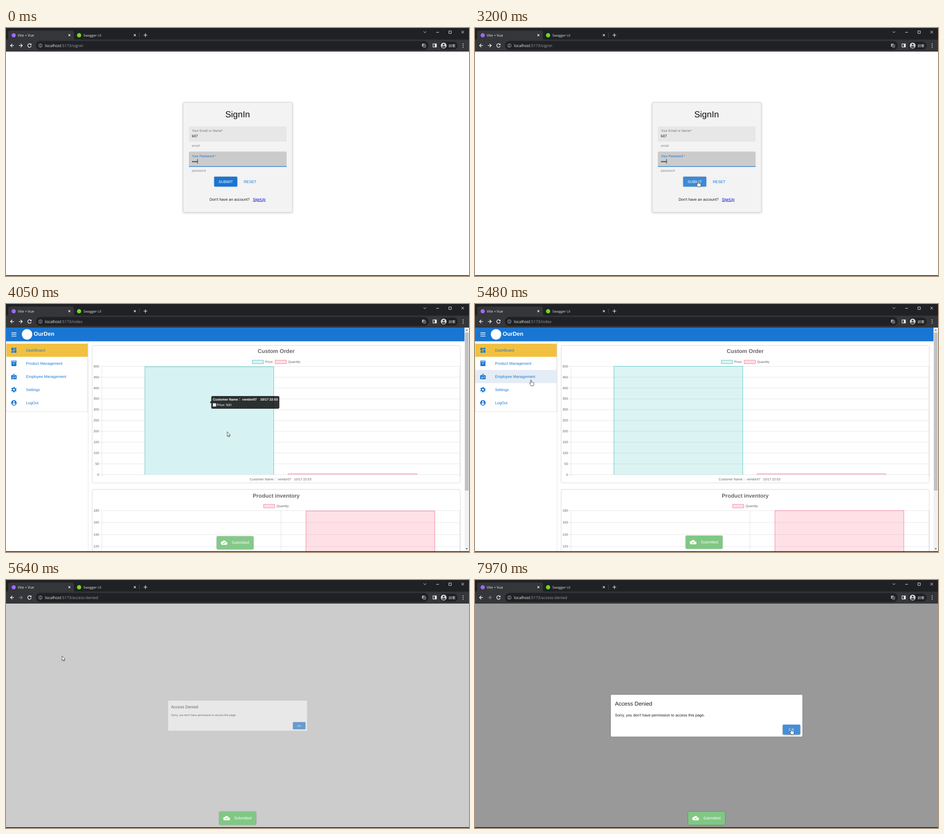
Recreate the animation shown at these times as an HTML page. Size 1023 by 547 pixels, loop 8000 ms.

```html
<!DOCTYPE html>
<html lang="en">
<head>
<meta charset="utf-8">
<title>Sign-in demo</title>
<style>
html, body { margin: 0; width: 100%; height: 100%; overflow: hidden; background: #fff; }
svg { display: block; width: 100vw; height: 100vh; }
text { font-family: "Liberation Sans", Arial, sans-serif; text-rendering: geometricPrecision; white-space: pre; }
.ui { font-family: "Open Sans", "Noto Sans CJK TC", "Noto Sans CJK JP", "Noto Sans CJK", sans-serif; }
.b { font-weight: bold; }
.mid { text-anchor: middle; }
.end { text-anchor: end; }
.lift { filter: drop-shadow(0 .8px 1px rgba(0,0,0,.38)); }
.card { filter: drop-shadow(0 1.5px 2.5px rgba(0,0,0,.2)); }
.line { fill: none; stroke: #fff; stroke-width: 1.1; }
.grid { fill: none; stroke: #000; stroke-opacity: .1; stroke-width: 1; }
</style>
</head>
<body>
<svg id="stage" viewBox="0 0 1023 547" preserveAspectRatio="none"></svg>
<script>
const LOOP = 8000, SIGNED_IN = 3280, DENIED = 5570;
const BLUE = '#1976d2', GREY = '#666';
const TEAL = ['rgba(75,192,192,.2)', 'rgb(75,192,192)'];
const PINK = ['rgba(255,99,132,.2)', 'rgb(240,120,145)'];

const text = (x, y, size, str, fill = '#1d1d1d', cls = '') =>
  `<text x="${x}" y="${y}" font-size="${size}" fill="${fill}" class="${cls}">${str}</text>`;
const rect = (x, y, w, h, fill, more = '') =>
  `<rect x="${x}" y="${y}" width="${w}" height="${h}" fill="${fill}" ${more}/>`;
const path = (d, more = '') => `<path d="${d}" ${more}/>`;
const circle = (x, y, r, fill, more = '') =>
  `<circle cx="${x}" cy="${y}" r="${r}" fill="${fill}" ${more}/>`;
const group = (id, body, more = '') => `<g id="${id}" ${more}>${body}</g>`;
const icon = (cx, cy, body) =>
  `<g transform="translate(${cx - 7.25} ${cy - 7.25}) scale(.604)" fill="${BLUE}">${body}</g>`;
const cross = (x, y, r) => path(`M${x - r} ${y - r}l${2 * r} ${2 * r}m0 ${-2 * r}l${-2 * r} ${2 * r}`, 'class="line"');

// Browser window
function browser() {
  return rect(0, 0, 1023, 26, '#202124') + rect(0, 25.5, 1023, 26.5, '#35363a') +
    path('M1 26Q5 26 5 22V10Q5 5.500 9.500 5.500H145.500Q150 5.500 150 10V22Q150 26 154 26z', 'fill="#35363a"') +
    circle(17, 16, 4.6, '#9a6cf5') + text(26, 18.8, 7.75, 'Vite + Vue', '#f1f3f4', 'ui') + cross(140, 15.7, 2.1) +
    circle(161.5, 16, 4.7, '#6fd925') + text(171, 18.8, 7.55, 'Swagger UI', '#dfe1e5', 'ui') + cross(284.7, 15.7, 2.1) +
    rect(294, 10, 0.8, 11, '#55565a') +
    path('M304 15.700h8m-4 -4v8', 'class="line" stroke-width="1.3"') +
    path('M922.500 7.500l3 3 3-3M950.500 9.500h6M978.500 6.500h5.500v5.500h-5.500zM1006.300 6.300l5.600 5.600m0-5.600l-5.600 5.600', 'class="line" style="stroke-width:.9"') +
    path('M17.500 38.700h-7.500m3.700-3.700l-3.700 3.700 3.700 3.700', 'class="line" style="stroke-width:1.3"') +
    path('M28.500 38.700h7.500m-3.700-3.700l3.700 3.700-3.700 3.700', 'id="forward" class="line" style="stroke-width:1.3"') +
    path('M55 36.200a3.900 3.900 0 1 0 .7 3.500', 'class="line" style="stroke-width:1.3"') +
    path('M56.300 34.200v3.600h-3.600z', 'fill="#fff"') +
    rect(66, 28.5, 868, 20, '#202124', 'rx="10"') +
    circle(76, 38.7, 3.8, 'none', 'stroke="#bdc1c6" stroke-width=".9"') +
    rect(75.5, 38, 1, 3, '#bdc1c6') + rect(75.5, 36.2, 1, 1, '#bdc1c6') +
    `<text x="86" y="41.700" font-size="8.600" class="ui" fill="#f1f3f4">localhost<tspan fill="#9aa0a6" id="url"></tspan></text>` +
    rect(919, 34.5, 6, 6.5, '#a3a7ab', 'rx=".8"') +
    rect(922, 36.5, 5.5, 6.5, '#35363a', 'rx=".8" stroke="#a3a7ab" stroke-width=".8"') +
    path('M923.200 38.700h3.200m-1.600-1v1m1 0q-.6 2-2.200 3m.5-2q1 1.500 2 2', 'fill="none" stroke="#a3a7ab" stroke-width=".6"') +
    rect(943.5, 35, 7.5, 7, 'none', 'stroke="#f1f3f4" stroke-width="1.2"') + rect(947.5, 35, 3.5, 7, '#f1f3f4') +
    rect(958, 30, 40, 17.5, '#202124', 'rx="8.700"') +
    circle(967, 38.7, 6.5, '#cfd1d4') + circle(967, 36.8, 2, '#35363a') +
    path('M963 42.300q0-2.400 4-2.400t4 2.400q-4 3-8 0z', 'fill="#35363a"') +
    text(978, 41.6, 7.6, '訪客', '#f1f3f4', 'ui') +
    [35, 38.7, 42.4].map(y => circle(1010, y, 0.95, '#f1f3f4')).join('');
}

function signIn() {
  return rect(391.3, 164.2, 241.4, 242.4, '#f3f3f3', 'rx="2.400" stroke="#ccc" stroke-width=".8" class="card"') +
    text(511.7, 197.3, 19.2, 'SignIn', '#111', 'mid') +
    path('M404 250.500V219.500q0-2.500 2.500-2.500H617.500q2.500 0 2.500 2.500V250.500z', 'fill="#e7e7e7"') +
    text(410.7, 229.4, 7.35, 'Your Email or Name*', '#757575') +
    text(410.7, 241.4, 8.6, 'kit7') + text(410.5, 261.5, 7.25, 'email', '#858585') +
    path('M404 306V275q0-2.500 2.500-2.500H617.500q2.500 0 2.500 2.500V306z', 'fill="#cbcbcb"') +
    rect(404, 304.9, 216, 1.3, BLUE) +
    text(410.7, 285, 7.3, 'Your Password *', BLUE) +
    [0, 1, 2, 3].map(i => circle(412.3 + 3 * i, 294.7, 1.2, '#222')).join('') +
    rect(422.8, 289.3, 0.9, 9.6, '#111', 'id="caret"') +
    text(410.5, 317, 7.25, 'password', '#858585') +
    rect(460, 328, 51, 21.7, BLUE, 'rx="1.800" class="lift"') +
    text(485.6, 341.8, 8.4, 'SUBMIT', '#fff', 'mid') +
    rect(460, 328, 51, 21.7, '#fff', 'rx="1.800" id="submitHover"') +
    text(525.5, 341.8, 8.4, 'RESET', BLUE) +
    text(449.7, 381, 8.46, "Don't have an account?") +
    `<g text-decoration="underline">${text(545.5, 381, 8.5, 'SignUp', '#0000e0')}</g>`;
}

const MENU = [
  ['DashBoard', path('M3 13h8V3H3zM3 21h8v-6H3zM13 21h8V11h-8zM13 3v6h8V3z')],
  ['Product Management', path('M20 2H4Q2 2 2 4V7Q2 8 3 8.700V20Q3 22 5 22H19Q21 22 21 20V8.700Q22 8 22 7V4Q22 2 20 2zM15 14H9V12H15zM20 7H4V5H20z', 'fill-rule="evenodd"')],
  ['Employee Management', path('M20 7H15V4Q15 2 13 2H11Q9 2 9 4V7H4Q2 7 2 9V20Q2 22 4 22H20Q22 22 22 20V9Q22 7 20 7zM11 4H13V9H11zM14 12H19V13.500H14zM14 15.500H19V17H14z', 'fill-rule="evenodd"') +
    circle(9, 13.5, 1.7, '#fff') + path('M5.700 18.500q0-2.500 3.300-2.500t3.300 2.500z', 'fill="#fff"')],
  ['Settings', circle(12, 12, 5.3, 'none', `stroke="${BLUE}" stroke-width="4"`) +
    circle(12, 12, 8.2, 'none', `stroke="${BLUE}" stroke-width="3.400" stroke-dasharray="4.600 3.987" transform="rotate(14 12 12)"`)],
  ['LogOut', circle(12, 12, 10, BLUE) + circle(12, 8.5, 3.1, '#fff') + path('M6 16q1-3 6-3t6 3q-2 3.200-6 3.200t-6-3.200z', 'fill="#fff"')]
];

function sidebar() {
  return rect(0.5, 84, 180, 153.5, '#fff', 'stroke="#dcdcdc" stroke-width=".8"') +
    rect(181, 82, 0.8, 465, '#dedede') +
    rect(1, 87.5, 179.5, 29, '#f2c040') +
    rect(1, 145.5, 179.5, 29, '#e4ecf6', 'id="rowHover"') +
    MENU.map(([label, shape], i) => icon(17.5, 102 + 29 * i, shape) +
      text(44.3, 105 + 29 * i, 8.42, label, BLUE)).join('');
}

const legend = (x, y, label, [fill, edge]) =>
  rect(x, y, 24.5, 7.7, fill, `stroke="${edge}" stroke-width=".9"`) + text(x + 28.5, y + 6, 7.3, label, GREY);

function axes(top, step, max, unit, lines, columns, bottom) {
  let out = '';
  for (let i = 0; i < lines; i++) {
    const y = top + step * i;
    out += path(`M207 ${y.toFixed(1)}H1003`, 'class="grid"') + text(205.5, (y + 2.2).toFixed(1), 7.4, max - unit * i, GREY, 'end');
  }
  return out + columns.map(x => path(`M${x} ${top}V${bottom}`, 'class="grid"')).join('');
}

const bar = (id, [fill, edge]) => path('', `id="${id}" fill="${fill}" stroke="${edge}" stroke-width=".9"`);
const orderLabel = 'Customer Name： vendor07';

function charts() {
  return rect(191, 92, 812, 302, '#fff', 'rx="2" class="lift"') +
    text(597, 108.4, 12.1, 'Custom Order', GREY, 'mid b') +
    legend(544.3, 124, 'Price', TEAL) + legend(594.8, 124, 'Quantity', PINK) +
    axes(137.5, 23.9, 500, 50, 11, [212, 1003], 381) +
    text(538.3, 389.3, 7.25, orderLabel, GREY) + text(674.7, 389.3, 7.25, '10/17 22:03', GREY, 'end') +
    bar('price', TEAL) + bar('quantity', PINK) +
    rect(191, 409.5, 812, 160, '#fff', 'rx="2" class="lift"') +
    text(597, 426.8, 12.1, 'Product inventory', GREY, 'mid b') +
    legend(569.3, 442, 'Quantity', PINK) +
    axes(455.7, 26.5, 180, 20, 4, [212, 607.5, 1003], 547) +
    bar('stock', PINK) +
    group('tip', path('M450.500 216.500l3-3V206q0-3 3-3H601q3 0 3 3V228q0 3-3 3H456.500q-3 0-3-3V219.500z', 'fill="#000" fill-opacity=".8"') +
      text(457, 213.2, 7.25, orderLabel, '#fff', 'b') + text(600.5, 213.2, 7.25, '10/17 22:03', '#fff', 'b end') +
      rect(457.5, 219.5, 6.2, 6.2, '#d9f1f1', 'stroke="#fff" stroke-width=".8"') + text(465.5, 225, 7.25, 'Price: 500', '#fff'));
}

function dashboard() {
  return charts() + sidebar() +
    rect(0, 52, 1013, 30, BLUE, 'class="lift"') +
    path('M12 63.500h11m-11 3.700h11m-11 3.700h11', 'class="line" style="stroke-width:1.300"') +
    circle(46.5, 67, 11.5, '#fff') + text(61.3, 70.4, 12.4, 'OurDen', '#fff', 'b') +
    rect(1013, 52, 10, 495, '#f1f1f1') + rect(1014, 63, 8, 348.5, '#c1c1c1') +
    path('M1015.700 58.800l2.300-2.800 2.300 2.800z', 'fill="#505050"') + path('M1015.700 538.700l2.300 2.800 2.300-2.800z', 'fill="#505050"');
}

function denied() {
  return rect(0, 52, 1023, 495, '#000', 'id="backdrop"') +
    group('dialog', rect(300, 253, 423.5, 92.5, '#fff', 'rx="2" class="lift"') +
      text(309.3, 276.5, 12.35, 'Access Denied') +
      text(309.3, 300.5, 8.44, "Sorry, you don't have permission to access this page.") +
      rect(680, 319, 38.5, 21.7, BLUE, 'rx="1.800" class="lift" id="ok"') + text(699.2, 332.8, 8.4, 'OK', '#fff', 'mid') +
      rect(680, 319, 38.5, 21.7, '#fff', 'rx="1.800" id="okHover"'));
}

const snackbar = () => rect(471, 511, 81.5, 29, '#81c784', 'rx="2.400" class="lift"') +
  `<g transform="translate(480.300 518) scale(.604)">${path('M19.350 10A7.500 7.500 0 0 0 5.350 8A6 6 0 0 0 6 20H19A5 5 0 0 0 19.350 10zM10 17L6.500 13.500 7.900 12.100 10 14.200 15.200 9 16.600 10.400z', 'fill="#fff" fill-rule="evenodd"')}</g>` +
  text(504.3, 528.2, 8.5, 'Submitted', '#fff');

const outline = 'fill="#fff" stroke="#222" stroke-width=".8" stroke-linejoin="round"';
const pointers = path('M0 0V10.400L2.400 8.300 4 11.600 5.400 11 3.900 7.700H7.200z', `id="arrow" ${outline}`) +
  path('M-1 7.500V1a1 1 0 0 1 2 0V5q1-.8 2 .3 1.200-.7 1.800.5 1.300-.4 1.500 1V9.500q0 1.500-.9 3.500H-.2Q-1 11-3.200 8.300q-.3-1.700 1.200-1.500z', `id="hand" ${outline}`);

document.getElementById('stage').innerHTML =
  rect(0, 0, 1023, 547, '#fff') +
  group('signInPage', signIn()) + group('indexPage', dashboard()) + group('deniedPage', denied()) +
  group('snack', snackbar()) + browser() + rect(0, 545.5, 1023, 1.5, '#0c0c0c') + group('cursor', pointers);

const ui = {};
document.querySelectorAll('[id]').forEach(el => ui[el.id] = el);
const set = (id, name, value) => ui[id].setAttribute(name, value);
const show = (id, on) => set(id, 'visibility', on ? 'inherit' : 'hidden');

const clamp = v => Math.min(1, Math.max(0, v));
const ramp = (t, from, to) => clamp((t - from) / (to - from));
const outQuart = p => 1 - (1 - p) ** 4;

// CSS "ease" curve: cubic-bezier(.25, .1, .25, 1)
function ease(p) {
  const curve = (a, b, s) => 3 * a * s * (1 - s) ** 2 + 3 * b * s * s * (1 - s) + s ** 3;
  let lo = 0, hi = 1;
  for (let i = 0; i < 20; i++) {
    const mid = (lo + hi) / 2;
    if (curve(.25, .25, mid) < p) lo = mid; else hi = mid;
  }
  return curve(.1, 1, lo);
}

// Keys are [time, value, value, ...], joined by straight lines
function track(keys, t) {
  const i = keys.findIndex(k => k[0] > t);
  if (i === 0) return keys[0].slice(1);
  if (i < 0) return keys[keys.length - 1].slice(1);
  const a = keys[i - 1], b = keys[i], p = (t - a[0]) / (b[0] - a[0]);
  return a.slice(1).map((v, n) => v + (b[n + 1] - v) * p);
}

const MOUSE = [
  [100, 575, 360], [400, 525, 349], [710, 492.5, 333.5], [1400, 492.5, 333.5], [1410, 492.8, 337.5],
  [1900, 492.8, 337.5], [1910, 492.3, 338.2], [2540, 492.3, 338.2], [2550, 492.8, 337.5], [3280, 492.8, 337.5],
  [3520, 489.7, 282], [4050, 489.7, 282], [4440, 127, 169], [4590, 127, 169], [4670, 123.8, 167.5],
  [6120, 123.8, 167.5], [6610, 643, 320], [7010, 643, 320], [7470, 697.5, 327], [7960, 697.5, 327], [7970, 698.7, 328]
];
const POP = [[5560, 0, 0, .4], [5640, .56, .49, .722], [5710, .945, .89, .969], [5790, 1, 1, 1]]; // opacity, backdrop, scale

const column = (x, width, base, height) => `M${x} ${base}v${-height}h${width}v${height}`;

function draw(t) {
  const page = t < SIGNED_IN ? 'signInPage' : t < DENIED ? 'indexPage' : 'deniedPage';
  for (const id of ['signInPage', 'indexPage', 'deniedPage']) show(id, id === page);
  ui.url.textContent = ':5173/' + { signInPage: 'signin', indexPage: 'index', deniedPage: 'access-denied' }[page];
  ui.forward.style.stroke = page === 'deniedPage' ? '#85878a' : '#fff';

  const [x, y] = track(MOUSE, t);
  const overSubmit = page === 'signInPage' && x < 511;
  const overMenu = page === 'indexPage' && x < 181;
  const overOk = page === 'deniedPage' && x > 680;
  const linked = overSubmit || overMenu || overOk;
  set('cursor', 'transform', `translate(${x} ${y})`);
  show('cursor', t >= 100);
  show('hand', linked);
  show('arrow', !linked);

  show('caret', Math.floor((t + 380) / 530) % 2 === 0);
  set('submitHover', 'opacity', .15 * ramp(t, 600, 870));
  show('rowHover', overMenu && y > 145.5 && y < 174.5);

  const grow = outQuart(ramp(t, 3297, 4297));
  const top = 376.5 - 239 * grow;
  set('price', 'd', column(306.9, 284.7, 376.5, 239 * grow));
  set('price', 'fill', x > 307 && x < 591 && y > top ? 'rgb(215,242,242)' : TEAL[0]);
  set('quantity', 'd', column(623.3, 284.7, 376.5, 2 * grow));
  set('stock', 'd', column(662.8, 284.7, 694.2, 238.5 * grow));
  set('tip', 'opacity', ramp(t, 3535, 3735) - ramp(t, 4130, 4330));

  const rise = ease(ramp(t, 3300, 4300));
  set('snack', 'opacity', t < 3300 ? 0 : rise);
  set('snack', 'transform', `translate(${page === 'indexPage' ? -5.5 : 0} ${30 * (1 - rise)})`);

  const [alpha, shade, scale] = track(POP, t);
  set('backdrop', 'opacity', .4 * shade);
  set('dialog', 'opacity', alpha);
  set('dialog', 'transform', `translate(511.75 299.3) scale(${scale}) translate(-511.75 -299.3)`);
  set('okHover', 'opacity', overOk ? .18 * ramp(t, 7330, 7470) : 0);
  ui.ok.style.filter = t >= 7970 ? 'drop-shadow(0 1.5px 1.6px rgba(0,0,0,.45))' : '';
}

const start = performance.now();
function tick() {
  draw((performance.now() - start) % LOOP);
  requestAnimationFrame(tick);
}
tick();
</script>
</body>
</html>
```
